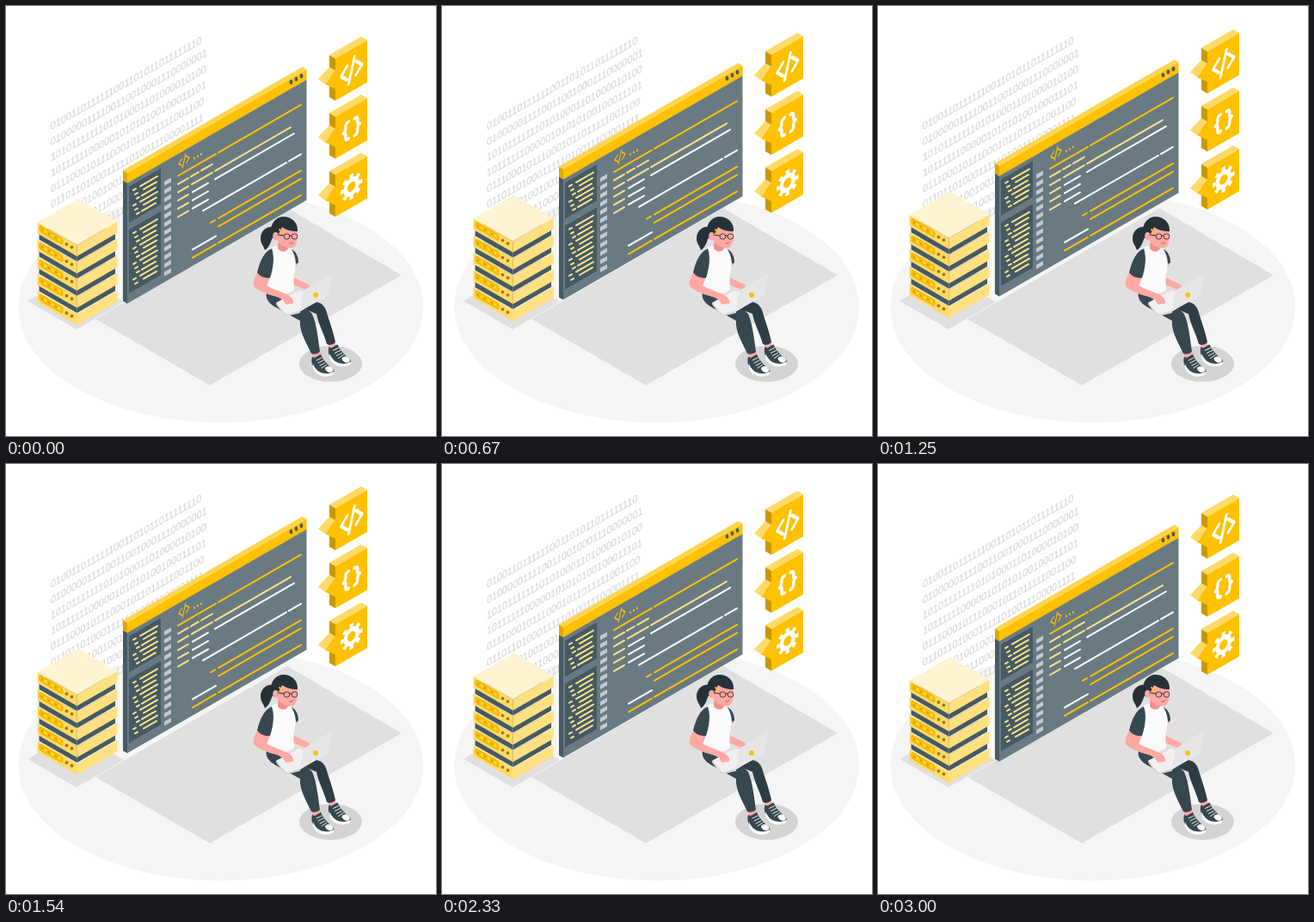
Recreate the animation shown at these times as an HTML page. Size 500 by 500 pixels, loop 3.04 s.

```html
<!DOCTYPE html>
<html lang="en">
<head>
<meta charset="utf-8">
<title>Programming</title>
<style>
  html, body { margin: 0; width: 100%; height: 100%; overflow: hidden; background: #fff; }
  svg { display: block; width: 100vw; height: 100vh; }
  text { font: 12.5px "Liberation Sans", Arial, sans-serif; fill: #d9d9d9; stroke: #d9d9d9; stroke-width: .25; }
  .line { fill: none; stroke-linecap: round; stroke-linejoin: round; }
</style>
</head>
<body>
<svg viewBox="0 0 500 500">
  <ellipse cx="249.7" cy="350" rx="235.5" ry="134.5" fill="#f5f5f5"/>
  <path d="M237 441 460 313 327 235 104 364z M25 343 82 376 137 344 80 311z" fill="#e0e0e0"/>
  <ellipse cx="377.5" cy="416" rx="36.5" ry="21" fill="#d4d4d4"/>
  <g id="digits"></g>
  <g id="float"></g>

  <g id="woman">
    <!-- legs -->
    <path d="M355 399l2 11 10-3-3-9z M374 389l2 10 8-3-2-9z" fill="#ffa8a4"/>
    <path d="M330 336l31 8c8 2 11 7 13 16 4 12 7 21 9 31-3 3-7 4-10 2-4-14-9-21-12-35l-22-9z" fill="#2e3d45"/>
    <path d="M303 333c-2 8 4 14 12 18l27 15c-1 13 7 25 13 38 4 2 8 0 10-2-2-15-4-33-9-44l-20-20z" fill="#37474f"/>
    <!-- shoes -->
    <g id="shoe">
      <path d="M356 408c-2 7 1 12 5 17 5 5 14 6 19 3 3-3 1-6-3-8l-8-9-3-6-7 4z" fill="#37474f"/>
      <path d="M357 416c2 6 7 10 12 11 5 1 9 0 12-2 1 3-1 4-4 5-6 2-14 0-18-5-2-3-3-6-2-9z M371 421c3-3 6-2 8 0 2 2 2 4-1 5-3 1-7-2-7-5z" fill="#fff"/>
      <path class="line" d="M361 412l6-3 M363 415l6-3 M365 418l6-3 M367 421l6-4" stroke="#eceff1"/>
    </g>
    <use href="#shoe" x="19.5" y="-11.5"/>

    <!-- far arm and shirt -->
    <path d="M332 283c5 2 8 8 8 15l-6 7-6-8z" fill="#37474f"/>
    <path d="M330 297l8 2c-1 7-3 13-3 17l17 8c2 3 0 5-3 6l-21-8z" fill="#ffa8a4"/>
    <path d="M313 279c-8 3-12 9-12 20l4 17c0 8-2 13-2 18 8 5 22 3 32-4 0-7-1-11 0-17 3-9 3-23-4-31z" fill="#fafafa"/>
    <path d="M317 272l-1 10c4 5 10 4 12 0l-1-6z" fill="#f28f8f"/>

    <!-- head -->
    <path d="M313 258c-8-4-17 3-17 12 0 7 4 9 5 14 8-5 6-14 13-20z" fill="#263238"/>
    <path d="M316 259c6-5 18-5 22 1 2 7 1 16-3 20-4 3-13 1-17-4-5-5-5-13-2-17z" fill="#ffa8a4"/>
    <path d="M310 270c-5-9-1-23 11-25 10-1 19 6 18 17-8 0-14-2-18-5l-4 8-3-1-2 6z" fill="#263238"/>
    <ellipse cx="313.5" cy="267.5" rx="3.3" ry="4.5" fill="#ffa8a4"/>
    <path class="line" d="M318 260l4 4" stroke="#ffc100" stroke-width="1.8"/>
    <path class="line" d="M316 266l7 1 M330 267h2" stroke="#263238"/>
    <g fill="none" stroke="#263238" stroke-width=".9">
      <ellipse cx="326.5" cy="268" rx="3.4" ry="3.2"/><ellipse cx="335.5" cy="268" rx="3.4" ry="3.2"/>
    </g>
    <path class="line" d="M330 276q3 1 4-1" stroke="#b75c5e"/>

    <!-- near arm -->
    <path d="M293 309c-4 6-7 14-4 18 6 5 18 9 28 12l14 8c4 1 6-1 3-4l-6-7c-8-4-19-7-25-11l5-12z" fill="#ffa8a4"/>
    <path d="M309 282c-8 3-14 14-17 28 4 5 10 7 15 6 3-9 6-23 2-34z" fill="#37474f"/>

    <!-- laptop -->
    <path d="M314 345l26-14 33 5-32 20-15 5z" fill="#f0f0f0"/>
    <path d="M314 345l12 14 16-5v3l-17 4-11-14z" fill="#d6d6d6"/>
    <path d="M319 336l10 1c4 2 6 6 5 9l-9 1z" fill="#ffa8a4"/>
    <path d="M341 355l5-23q1-2 3-3l27-17q3-1 3 2l-4 21q0 2-2 3z" fill="#e6e6e6"/>
    <circle cx="360" cy="336" r="3" fill="#ffc100"/>
  </g>
</svg>
<script>
const $ = id => document.getElementById(id);
const YELLOW = '#ffc100', PALE = '#ffe28a', WHITE = '#fff', SLATE = '#455a64', SLOPE = .577;

const loop = (n, part) => Array.from({ length: n }, (_, i) => part(i)).join('');
const move = (y, content) => `<g transform="translate(0 ${y})">${content}</g>`;
const poly = (points, fill) => `<polygon points="${points}" fill="${fill}"/>`;
const stroke = (d, color, width) => `<path class="line" d="${d}" stroke="${color}" stroke-width="${width}"/>`;
// A line rising to the right along the isometric axis
const rise = (x, y, w, color) => stroke(`M${x} ${y}l${w} ${-w * SLOPE}`, color, 2);
const wall = (x, y, w, h, fill) =>
  poly([x, y, x + w, y - w * SLOPE, x + w, y - w * SLOPE + h, x, y + h], fill);
const onWall = (x, y, content, scale = 1) =>
  `<g transform="matrix(.866 -.5 0 1 ${x} ${y}) scale(${scale})">${content}</g>`;

// Isometric box; (x, y) is the upper end of its front edge
function box(x, y, left, right, h, leftFill, rightFill, topFill) {
  const ly = y - left * SLOPE, ry = y - right * SLOPE;
  return poly([x, y, x - left, ly, x - left, ly + h, x, y + h], leftFill)
    + wall(x, y, right, h, rightFill)
    + poly([x, y, x - left, ly, x + right - left, ly + ry - y, x + right, ry], topFill);
}

let seed = 7;
const random = () => (seed = seed * 16807 % 2147483647) / 2147483647;

const digits = () => loop(9, row =>
  onWall(52, 144.5 + 18.2 * row, `<text>${loop(31, () => Math.round(random()))}</text>`));

const tag = (color, width) => stroke('M-3-4-7 0-3 4M2-7-2 7M3-4 7 0 3 4', color, width);

function sidebar() {
  const list = (top, count) => loop(count, i => {
    const y = x => top + 6 * i + (176 - x) * SLOPE;
    const start = 156 + i * 4 % 6, dot = 148 + i % 3 * 2;
    return rise(start, y(start), 176 - start - i % 3, PALE) + rise(dot, y(dot), 3, PALE);
  });
  return wall(143, 210, 37, 42, SLATE) + list(198, 6)
    + wall(143, 260, 37, 74, SLATE) + list(248, 11);
}

function codeLines() {
  const rowY = (row, x) => 197.5 + 9.55 * row - (x - 200) * SLOPE;
  const run = (row, from, to, color) => rise(from, rowY(row, from), to - from, color);
  const runs = (rows, ...rest) => rows.map(row => run(row, ...rest)).join('');
  return loop(12, row => wall(184, rowY(row, 184) - 2.5, 8, 5, '#c3cace'))
    + runs([1, 2, 3, 4, 5], 200, 212, PALE)
    + runs([3, 4, 5], 217, 235, WHITE)
    + runs([0, 8, 9, 11], 247, 343, YELLOW)
    + runs([0, 11], 217, 244, YELLOW) + run(0, 200, 217, YELLOW) + run(8, 238, 243, YELLOW)
    + run(1, 215, 224, PALE) + run(1, 227, 240, PALE)
    + run(2, 216, 240, PALE) + run(2, 243, 331, PALE)
    + run(3, 243, 335, WHITE) + run(6, 229, 326, WHITE) + run(6, 329, 343, WHITE)
    + run(10, 217, 244, WHITE);
}

function codeWindow() {
  const dot = (x, y, r, fill) => `<ellipse cx="${x}" cy="${y}" rx="${r}" ry="${r * 1.4}" fill="${fill}"/>`;
  return box(141, 206, 5, 208.5, 140, SLATE, '#6a7a82', SLATE)
    + box(141, 194, 5, 208.5, 12, '#e0a900', YELLOW, '#ffd54f')
    + loop(3, i => dot(331.5 + 6 * i, 88.5 - 3.5 * i, 1.9, SLATE))
    + sidebar() + codeLines()
    + onWall(207, 180, tag(YELLOW, 1.5))
    + loop(3, i => dot(219 + 4 * i, 177 - 2.3 * i, 1, YELLOW));
}

function bubble(icon, i) {
  return move(67.5 * i, box(383, 61, 7, 37, 49, '#c99800', YELLOW, '#ffda66')
    + poly([371, 91, 383, 75, 384, 97], YELLOW)
    + poly([363, 85, 376, 71, 383, 75, 371, 91], '#ffda66')
    + onWall(401.8, 75, icon));
}

const icons = [
  `<g transform="scale(2)">${tag(WHITE, 1.8)}</g>`,
  stroke('M-4-10q-4 0-4 4v2q0 3-3 4 3 1 3 4v2q0 4 4 4M4-10q4 0 4 4v2q0 3 3 4-3 1-3 4v2q0 4-4 4', WHITE, 4),
  `<g fill="none" stroke="#fff" transform="scale(1.15)"><circle r="7" stroke-width="4.6"/>
    <circle r="10.5" stroke-width="4.5" pathLength="16" stroke-dasharray="1" stroke-dashoffset=".5"/></g>`
];

function server(y, raised) {
  const label = '<g transform="matrix(1 .577 0 1 39 254)">'
    + `<rect y="1" width="27" height="7" rx="2" fill="${YELLOW}" stroke="#e0a900" stroke-width=".7"/>`
    + loop(6, i => stroke(`M${3 + 4 * i} 3.500v2`, i % 2 ? '#fff0bf' : '#b38700', 1.1)) + '</g>';
  const lights = loop(2, i => `<circle cx="${70.5 + 6 * i}" cy="${277 + 3.5 * i}" r="1.9" fill="#a17a00"/>`);
  const gap = raised ? box(82.5, 270, 44, 44.5, 7, SLATE, SLATE, SLATE) : '';
  return move(y, box(82.5, 278, 46, 47, 13, '#ffda66', '#ffe080', '#fff4d1') + label + lights + gap);
}

$('digits').innerHTML = digits();
$('float').innerHTML = codeWindow() + icons.map(bubble).join('')
  + loop(5, i => server(80 - 20 * i, i < 4));

const LOOP = 3040, CYCLE = 3000, LIFT = 10;
const origin = performance.now();
function draw() {
  const t = Math.min((performance.now() - origin) % LOOP, CYCLE);
  const lift = LIFT * (1 - Math.abs(1 - 2 * t / CYCLE));
  $('float').setAttribute('transform', `translate(0 ${-lift})`);
  requestAnimationFrame(draw);
}
draw();
</script>
</body>
</html>
```
